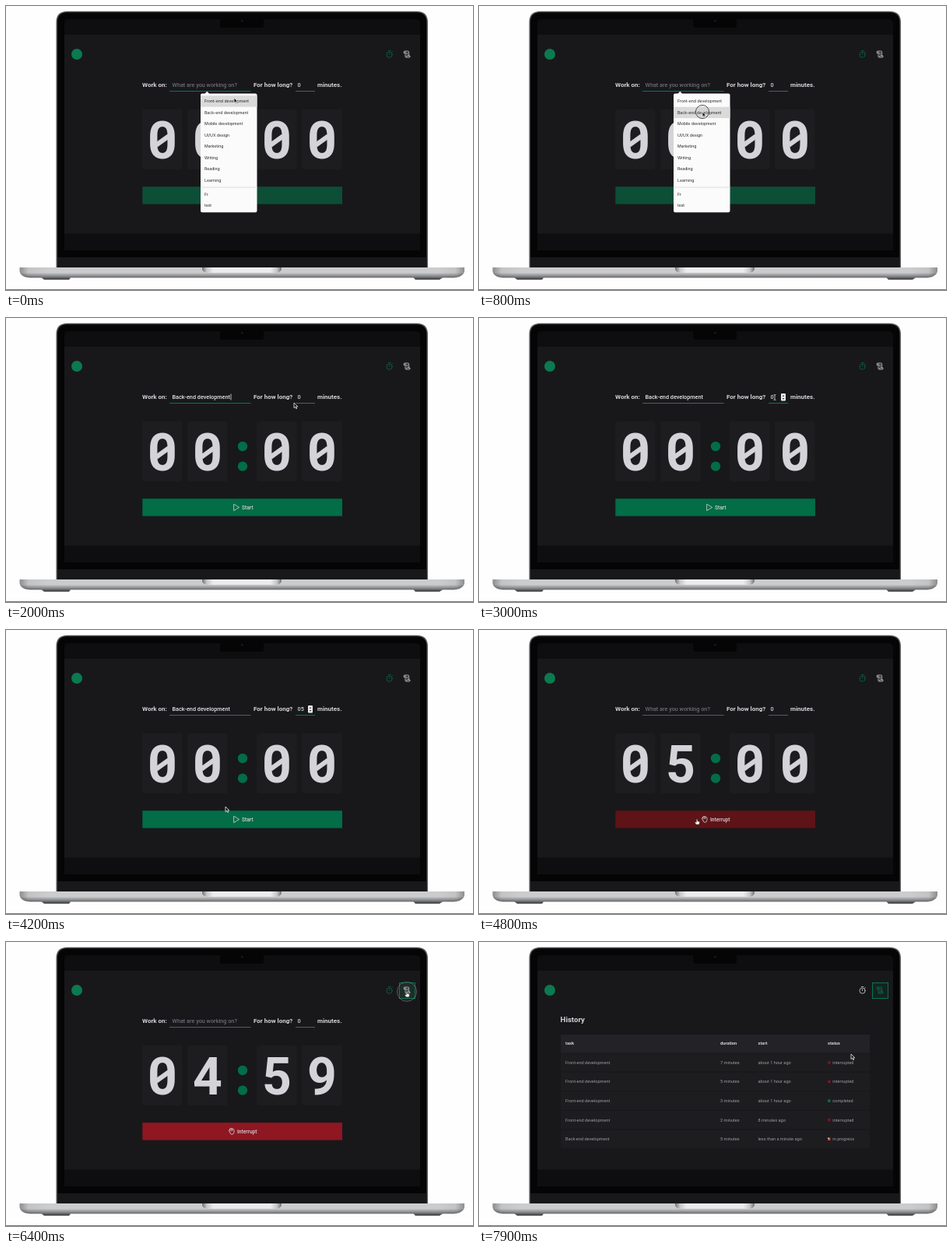
Write an HTML page that moves like this. It is 600x365 px and loops after 8000 ms.

```html
<!DOCTYPE html>
<html lang="en">
<head>
<meta charset="utf-8">
<title>Focus timer</title>
<style>
  html, body { margin: 0; width: 100%; height: 100%; overflow: hidden; background: #fefefe; }
  svg { display: block; }
  text { font-family: Roboto, sans-serif; fill: #d4d4d8; }
  .label { font-size: 8px; font-weight: 700; }
  .input { font-size: 7.25px; font-weight: 500; }
  .button { font-size: 6.6px; font-weight: 500; }
  .digit { font-size: 66px; font-weight: 700; text-anchor: middle; }
  .slash { stroke: #d4d4d8; stroke-width: 6; }
  .option { font: 5.15px Inter, sans-serif; fill: #222; }
  .head { font-size: 5.7px; font-weight: 700; }
  .cell { font-size: 5.6px; fill: #9c9ca3; }
  .line { fill: none; stroke-width: .8; stroke-linejoin: round; stroke-linecap: round; }
</style>
</head>
<body>
<svg width="600" height="365" viewBox="0 0 600 365">
  <defs>
    <linearGradient id="metal">
      <stop offset="0" stop-color="#8c8d8f"/><stop offset=".02" stop-color="#c2c3c5"/>
      <stop offset=".06" stop-color="#cbccce"/><stop offset=".94" stop-color="#cbccce"/>
      <stop offset=".98" stop-color="#c2c3c5"/><stop offset="1" stop-color="#8c8d8f"/>
    </linearGradient>
    <linearGradient id="lip">
      <stop offset="0" stop-color="#6f7073"/><stop offset=".06" stop-color="#c8c8ca"/>
      <stop offset=".14" stop-color="#ececee"/><stop offset=".86" stop-color="#ececee"/>
      <stop offset=".94" stop-color="#c8c8ca"/><stop offset="1" stop-color="#6f7073"/>
    </linearGradient>
    <linearGradient id="shade" x2="0" y2="1">
      <stop offset=".2" stop-color="#000" stop-opacity="0"/><stop offset="1" stop-color="#000" stop-opacity=".48"/>
    </linearGradient>
  </defs>

  <!-- laptop -->
  <path d="M64.5 336V21Q64.5 6.8 79 6.8H527.4Q541.9 6.8 541.9 21V336Z" fill="#4b4c4f"/>
  <path d="M66 336V21Q66 8.2 79 8.2H527.4Q540.4 8.2 540.4 21V336Z" fill="#050506"/>
  <path d="M75 314V23Q75 17 81 17H526Q532 17 532 23V314Z" fill="#0e0e10"/>
  <rect x="75" y="37" width="457" height="255.5" fill="#18181b"/>
  <path d="M275 17H331V24Q331 28 327 28H279Q275 28 275 24Z" fill="#050506"/>
  <circle cx="303.5" cy="19" r="1.5" fill="#15182a"/>
  <rect x="66" y="323" width="474.4" height="13" fill="#18181a"/>
  <path d="M45.5 349H83L81 351.8H49ZM523.5 349H561L557 351.8H526Z" fill="#48484a"/>
  <path d="M17.5 336H589V341Q587 349.3 572 349.3H34Q19 349.3 17.5 341Z" fill="url(#metal)"/>
  <path d="M17.5 341H589Q587 349.3 572 349.3H34Q19 349.3 17.5 341Z" fill="url(#shade)"/>
  <path d="M252 336H354V338Q353 342.7 347 342.7H259Q253 342.7 252 338Z" fill="url(#lip)"/>
  <path d="M0 364.5H600" stroke="#77777a"/>

  <!-- navigation -->
  <circle cx="91" cy="62" r="7" fill="#0b7a50"/>
  <g id="timerIcon" class="line">
    <circle cx="492.6" cy="62.6" r="3.6"/><path d="M491.3 57.5H493.9M492.6 60.7V62.6M495.4 59.2L496.2 58.4"/>
  </g>
  <rect id="navBox" x="505.5" y="52.5" width="20" height="20" fill="#13241f" stroke="#08754d"/>
  <path id="historyIcon" class="line" d="M513 60.5H511.2V59Q511.2 58 512.2 58H516.5Q517.6 58 517.6 59V64M513 58.5V65Q513 66 514 66H518Q519 66 519 65V64H514.8V65M514.6 60.3H516M514.6 62H516"/>

  <g id="timerPage">
    <text class="label" x="175" y="104.3">Work on:</text>
    <text class="input" id="task" x="213.5" y="104"></text>
    <text class="label" x="318" y="104.3">For how long?</text>
    <text class="input" id="minutes" x="374.6" y="104"></text>
    <text class="label" x="400" y="104.3">minutes.</text>
    <path id="taskLine" d="M210 109.5H314.5"/>
    <path id="minutesLine" d="M372 109.5H397"/>
    <rect id="caret" y="97.5" width=".8" height="8" fill="#e4e4e7"/>
    <g id="spinner">
      <rect x="388" y="97" width="6" height="9.5" rx="1" fill="#eee"/>
      <path d="M389.5 100.7L391 99L392.5 100.7ZM389.5 103L391 104.7L392.5 103Z" fill="#333"/>
    </g>
    <g id="clock"></g>
    <circle cx="304" cy="165" r="6.2" fill="#036d47"/><circle cx="304" cy="190.6" r="6.2" fill="#036d47"/>
    <rect id="button" x="175.3" y="232.2" width="256.7" height="22.4"/>
    <g id="start">
      <path class="line" stroke="#d4d4d8" d="M293 239.4L299.6 243.4L293 247.4Z"/>
      <text class="button" x="303" y="245.7">Start</text>
    </g>
    <g id="interrupt">
      <path class="line" stroke="#d4d4d8" d="M287.5 244L286 242.2Q286.6 241.2 287.6 242V240Q288.5 239 289 240Q290 238.6 290.6 240Q291.8 239.4 292 241Q293 240.8 293 242V244.5Q292.6 247.3 290 247.3Q288 247.3 287.5 244M289 240V242.6M290.6 240V242.6"/>
      <text class="button" x="297" y="245.7">Interrupt</text>
    </g>
    <g id="menu">
      <path d="M252 112.5H255.5L258.3 109.8L261 112.5H320.5Q322.5 112.5 322.5 114.5V263Q322.5 265.3 320.5 265.3H252Q250 265.3 250 263V114.5Q250 112.5 252 112.5Z" fill="#fbfbfb"/>
      <rect id="highlight" x="250" width="72.5" height="14.4" fill="#dadada"/>
      <path d="M250 233H322.5" stroke="#ddd"/>
    </g>
  </g>

  <g id="historyPage">
    <text x="104.6" y="103.3" font-size="9.6" font-weight="700">History</text>
    <rect x="105" y="119" width="397" height="23.5" fill="#232327"/>
  </g>

  <g id="ring">
    <circle id="ringOuter" fill="#999" fill-opacity=".08" stroke="#fff" stroke-opacity=".28"/>
    <circle id="ringInner" fill="none" stroke="#222"/>
  </g>
  <g id="pointer" stroke-linejoin="round" stroke-width=".8">
    <path id="arrow" d="M0 0V6.6L1.6 5.2L2.7 7.6L3.8 7.1L2.7 4.8H4.8Z" fill="#111" stroke="#eee"/>
    <path id="beam" d="M-1.5 -3.5Q0 -3.5 0 -2.5V2.5Q0 3.5 -1.5 3.5M1.5 -3.5Q0 -3.5 0 -2.5M0 2.5Q0 3.5 1.5 3.5" fill="none" stroke="#ddd"/>
    <path id="hand" d="M-.7 .5Q0 -.5 .7 .5V2.6L3.4 3.3V5.2L2.6 7H-1L-2.8 4.2Q-2.4 3.2 -.7 4.2Z" fill="#fff" stroke="#222" stroke-width=".5"/>
  </g>
</svg>
<script>
const LOOP = 8000, STEP = 100;
const $ = id => document.getElementById(id);
const show = (id, on) => $(id).style.display = on ? '' : 'none';
const set = (id, attrs) => { for (const k in attrs) $(id).setAttribute(k, attrs[k]); };
const add = (id, markup) => $(id).insertAdjacentHTML('beforeend', markup);
const clamp = v => Math.max(0, Math.min(1, v));
const smooth = v => v * v * (3 - 2 * v);

['Front-end development', 'Back-end development', 'Mobile development', 'UI/UX design', 'Marketing',
 'Writing', 'Reading', 'Learning', 'Fr', 'test'].forEach((name, i) =>
  add('menu', `<text class="option" x="255" y="${124.3 + i * 14.5 + (i > 7 ? 3.2 : 0)}">${name}</text>`));

// Each zero gets a slash across its counter
[201, 259, 348, 406].forEach(x => add('clock',
  `<rect x="${x - 26}" y="133" width="51.5" height="77" rx="3" fill="#1d1d20"/>
   <text class="digit" x="${x}" y="196.2">0</text>
   <path class="slash" d="M${x - 8} 178.8L${x + 8} 167.2"/>`));
const digits = document.querySelectorAll('.digit'), slashes = document.querySelectorAll('.slash');

const COLUMNS = [111, 310, 358.5, 448];
['task', 'duration', 'start', 'status'].forEach((name, i) =>
  add('historyPage', `<text class="head" x="${COLUMNS[i]}" y="132">${name}</text>`));
const STATUS = { interrupted: '#86141f', completed: '#08754d', 'in progress': '#e04a35' };
[['Front-end development', 7, 'about 1 hour ago', 'interrupted'],
 ['Front-end development', 5, 'about 1 hour ago', 'interrupted'],
 ['Front-end development', 3, 'about 1 hour ago', 'completed'],
 ['Front-end development', 2, '8 minutes ago', 'interrupted'],
 ['Back-end development', 5, 'less than a minute ago', 'in progress']].forEach(([task, length, start, status], i) => {
  const y = 143 + i * 24.6;
  const cell = (x, s) => `<text class="cell" x="${x}" y="${y + 13.7}">${s}</text>`;
  add('historyPage', `<rect x="105" y="${y}" width="397" height="23.6" fill="#1d1d20"/>` +
    cell(COLUMNS[0], task) + cell(COLUMNS[1], length + ' minutes') + cell(COLUMNS[2], start) + cell(454.3, status) +
    `<rect x="448.3" y="${y + 10.2}" width="3.2" height="3.4" fill="${STATUS[status]}"/>`);
  if (status === 'in progress') add('historyPage', `<rect x="448.3" y="${y + 10.2}" width="1.4" height="1.4" fill="#eee"/>`);
});

// Pointer stops: time, x, y
const PATH = [[0, 293, 118], [700, 287, 136], [1400, 287, 136], [2000, 370, 109], [2300, 380, 102], [3700, 380, 102],
  [3900, 342, 163], [4000, 342, 163], [4200, 282, 227], [4400, 280, 243], [4900, 280, 243], [5700, 515, 63.8],
  [7700, 515, 63.8], [7900, 478, 144]];
const CLICKS = [700, 2400, 4400, 6200];

function pointerAt(t) {
  const i = Math.max(1, PATH.findIndex(p => p[0] >= t));
  const [a, b] = [PATH[i - 1], PATH[i]];
  const k = smooth(clamp((t - a[0]) / (b[0] - a[0])));
  return [a[1] + (b[1] - a[1]) * k, a[2] + (b[2] - a[2]) * k];
}

function mix(a, b, k) {
  return `rgb(${a.map((v, i) => Math.round(v + (b[i] - v) * k))})`;
}

function draw(t) {
  const [x, y] = pointerAt(t);
  const running = t >= 4600, history = t >= 6500;
  const editing = t < 2400 ? 'task' : t < 4400 ? 'minutes' : '';
  show('timerPage', !history);
  show('historyPage', history);

  // Task and minutes fields
  const filled = t >= 900 && !running;
  $('task').textContent = filled ? 'Back-end development' : 'What are you working on?';
  $('task').style.fill = filled ? '#e4e4e7' : '#6c6c73';
  const typed = t >= 3200 && !running;
  $('minutes').textContent = typed ? '05' : '0';
  for (const field of ['task', 'minutes'])
    set(field + 'Line', { stroke: editing === field ? '#08754d' : '#5a5a60' });
  show('spinner', editing === 'minutes');
  const caretStart = t < 2400 ? 900 : t < 3200 ? 2400 : 3200;
  show('caret', t >= 900 && editing && (t - caretStart) % 1100 < 600);
  set('caret', { x: t < 2400 ? 288.6 : typed ? 383.7 : 379.2 });

  // Suggestions
  show('menu', t < 900);
  set('highlight', { y: y < 129.5 ? 115.2 : 129.7 });

  // Clock and button
  [...(t >= 5600 ? '0459' : running ? '0500' : '0000')].forEach((d, i) => {
    digits[i].textContent = d;
    slashes[i].style.display = d === '0' ? '' : 'none';
  });
  const enabled = clamp((t - 900) / 400), hover = y > 232 && y < 255;
  set('button', { fill: running ? (hover ? '#5e1317' : '#8e1721')
    : t >= 4400 ? '#0d5339' : mix([13, 78, 54], [2, 109, 70], enabled) });
  set('start', { opacity: .5 + .5 * enabled });
  show('start', !running);
  show('interrupt', running);

  // Navigation
  show('navBox', t >= 5700);
  set('timerIcon', { stroke: history ? '#d4d4d8' : '#08694a' });
  set('historyIcon', { stroke: history ? '#08754d' : '#d4d4d8' });

  // Pointer and click ring
  const hand = t >= 4400 && hover || t >= 5700 && t <= 7700;
  const beam = t >= 2200 && t < 3200;
  show('hand', hand);
  show('beam', beam);
  show('arrow', !hand && !beam && !(t >= 3200 && t < 3800));
  set('pointer', { transform: `translate(${x} ${y})` });
  const age = t - CLICKS.findLast(c => c <= t);
  show('ring', age < 300);
  if (age < 300) {
    set('ring', { transform: `translate(${x} ${y})` });
    set('ringOuter', { r: 6.5 + age * .03 });
    set('ringInner', { r: 5.6 + age * .03, opacity: 1 - age / 400 });
  }
}

function tick() {
  draw(Math.floor(performance.now() % LOOP / STEP) * STEP);
  requestAnimationFrame(tick);
}
tick();
</script>
</body>
</html>
```
